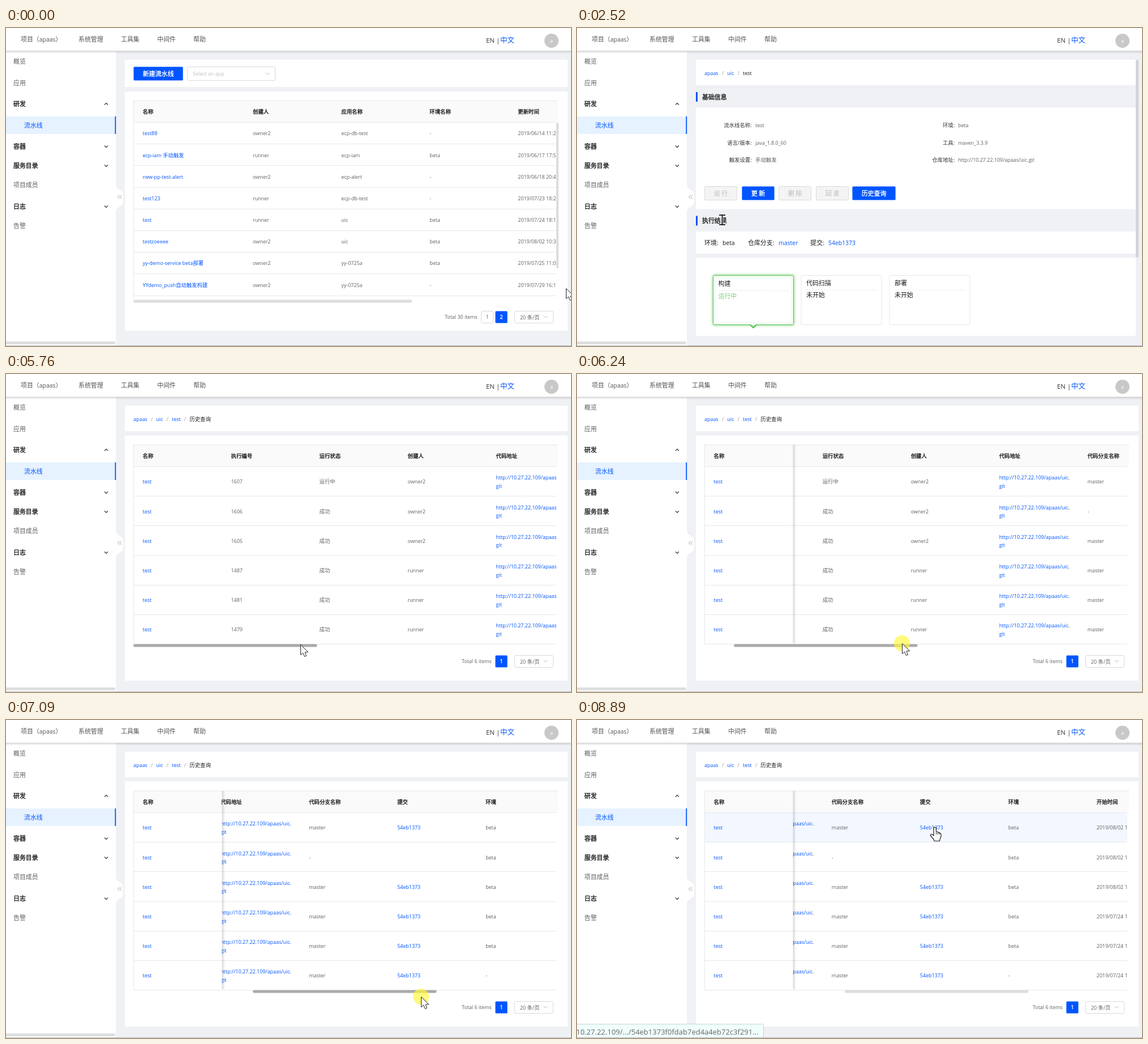
These frames come from a looping animation (998x561 px, 9.75 s). An HTML page with a canvas:

```html
<!DOCTYPE html>
<html lang="zh">
<head>
<meta charset="utf-8">
<style>
html, body { margin: 0; width: 100%; height: 100%; overflow: hidden; background: #f0f2f5; }
canvas { display: block; }
</style>
</head>
<body>
<canvas id="stage" width="998" height="561"></canvas>
<script>
const ctx = document.getElementById('stage').getContext('2d');
const LOOP = 9750;
const BLUE = '#0055ff', BG = '#eff1f5', INK = '#1c1c1c', GREY = '#606060', LINE = '#e6e8eb';
const SMALL = 9.4, BODY = 10.95;
const ROW = 52.2, ROW_TOP = 163.5;

// Text: Latin runs are set a little smaller so both scripts look equally large.
const runs = s => s.match(/[\u2e80-\uffef]+|[^\u2e80-\uffef]+/g) || [];
function setFont(run, size) {
  ctx.font = /[\u2e80-\uffef]/.test(run)
    ? `${size}px "Noto Sans CJK SC", "Noto Sans CJK", sans-serif`
    : `${size * 0.95}px "Open Sans", "Noto Sans", sans-serif`;
}
function textWidth(s, size = SMALL) {
  return runs(s).reduce((sum, run) => {
    setFont(run, size);
    return sum + ctx.measureText(run).width;
  }, 0);
}
// Weight 500 is a regular face with a hairline outline.
function text(s, x, y, color = GREY, size = SMALL, weight = 400, align = 0) {
  x -= align * textWidth(s, size);
  ctx.fillStyle = ctx.strokeStyle = color;
  ctx.lineWidth = 0.35;
  for (const run of runs(s)) {
    setFont(run, size);
    const baseline = Math.round(y + size * 0.37);
    ctx.fillText(run, x, baseline);
    if (weight === 500) ctx.strokeText(run, x, baseline);
    x += ctx.measureText(run).width;
  }
}

// Shapes
function rect(x, y, w, h, color) {
  ctx.fillStyle = color;
  ctx.fillRect(x, y, w, h);
}
function pill(x, y, w, h, color, r = h / 2) {
  ctx.fillStyle = color;
  ctx.beginPath();
  ctx.roundRect(x, y, w, h, r);
  ctx.fill();
}
function frame(x, y, w, h, fill, stroke) {
  ctx.beginPath();
  ctx.roundRect(x + 0.5, y + 0.5, w - 1, h - 1, 2);
  ctx.fillStyle = fill;
  ctx.fill();
  ctx.strokeStyle = stroke;
  ctx.lineWidth = 1;
  ctx.stroke();
}
const solid = (x, y, w, h, color) => pill(x + 0.4, y + 0.4, w - 0.8, h - 0.8, color, 1.5);
function polyline(points, stroke, width = 1, fill) {
  ctx.beginPath();
  points.forEach(([x, y]) => ctx.lineTo(x, y));
  if (fill) {
    ctx.closePath();
    ctx.fillStyle = fill;
    ctx.fill();
  }
  ctx.strokeStyle = stroke;
  ctx.lineWidth = width;
  ctx.stroke();
}
function chevron(x, y, color, dir = 1, half = 3, width = 1) {
  polyline([[x - half, y - dir * half / 2], [x, y + dir * half / 2], [x + half, y - dir * half / 2]], color, width);
}
function clipped(x, y, w, h, draw) {
  ctx.save();
  ctx.beginPath();
  ctx.rect(x, y, w, h);
  ctx.clip();
  draw();
  ctx.restore();
}
const card = (y, bottom, right = 992) => rect(210, y, right - 210, bottom - y, '#fff');

function button(label, x, w, y, state = 'primary') {
  const off = state === 'disabled';
  if (off) frame(x, y, w, 25, '#f4f4f4', '#d9d9d9');
  else solid(x, y, w, 25, state === 'hover' ? '#2b78ff' : BLUE);
  text(label, x + w / 2, y + 13, off ? '#b9b9b9' : '#fff', BODY, off ? 400 : 500, 0.5);
}

// Page frame
function shell() {
  rect(0, 0, 998, 561, BG);
  rect(0, 41, 194, 520, '#fff');
  polyline([[194, 279], [196, 283], [205, 289], [206.5, 292], [206.5, 308], [205, 312], [196, 318], [194, 322]], '#fff', 1, '#fff');
  for (const x of [197.5, 201])
    polyline([[x + 3, 294.5], [x, 298], [x + 3, 301.5]], '#aaa');

  rect(0, 0, 998, 41, '#fff');
  const shade = ctx.createLinearGradient(0, 40, 0, 45);
  shade.addColorStop(0, 'rgba(0,0,0,.17)');
  shade.addColorStop(1, 'rgba(0,0,0,0)');
  rect(0, 40, 998, 5, shade);
  [['项目（apaas）', 26], ['系统管理', 128], ['工具集', 203], ['中间件', 267], ['帮助', 331]]
    .forEach(([label, x]) => text(label, x, 20, '#555', BODY));
  text('EN |', 848, 21.5, '#333', 12);
  text('中文', 873, 21.5, BLUE, 12.5);
  pill(951, 10, 25, 25, '#c8c8c8');
  text('a', 963.5, 23, '#fff', 9.4, 400, 0.5);

  rect(0, 156, 194, 31, '#e6f2ff');
  rect(192.4, 156, 1.8, 31, BLUE);
  text('流水线', 32, 171.5, BLUE, BODY);
  [['概览', 59], ['应用', 97], ['研发', 134, -1], ['容器', 209, 1], ['服务目录', 243, 1],
    ['项目成员', 277], ['日志', 315, 1], ['告警', 349]].forEach(([label, y, dir]) => {
    text(label, 13, y, dir ? INK : GREY, BODY, dir ? 500 : 400);
    if (dir) chevron(177, y, '#444', dir, 3, 1.3);
  });
  pill(-3, 553, 196, 5, '#dedede');
}

function crumbs(...names) {
  let x = 225;
  names.forEach((name, i) => {
    const last = i === names.length - 1;
    text(name, x, 79.5, last ? INK : BLUE);
    x += textWidth(name);
    if (!last) text('/', x + 6.3, 79.5, '#999');
    x += 15.7;
  });
}

function pager(total, pages, y) {
  text(`Total ${total} items`, pages > 1 ? 775 : 805, y + 11);
  if (pages > 1) {
    frame(839, y, 22, 22, '#fff', '#d9d9d9');
    text('1', 850, y + 11, GREY, SMALL, 400, 0.5);
  }
  solid(864, y, 22, 22, BLUE);
  text(String(pages), 875, y + 11, '#fff', SMALL, 500, 0.5);
  frame(898, y, 69, 22, '#fff', '#d9d9d9');
  text('20 条/页', 908, y + 11.5);
  chevron(953, y + 10.5, '#bbb', 1, 3.5);
}

// Pages
const PIPELINES = [
  ['test88', 'owner2', 'ecp-db-test', '-', '2019/06/14 11:23'],
  ['ecp-iam 手动触发', 'runner', 'ecp-iam', 'beta', '2019/06/17 17:55'],
  ['new-pp-test-alert', 'owner2', 'ecp-alert', '-', '2019/06/18 20:42'],
  ['test123', 'runner', 'ecp-db-test', '-', '2019/07/23 18:20'],
  ['test', 'runner', 'uic', 'beta', '2019/07/24 18:15'],
  ['testzoeeee', 'owner2', 'uic', 'beta', '2019/08/02 10:35'],
  ['yy-demo-service beta部署', 'owner2', 'yy-0725a', 'beta', '2019/07/25 11:02'],
  ['YYdemo_push自动触发构建', 'owner2', 'yy-0725a', '-', '2019/07/29 16:15']
];

function listPage() {
  card(56, 104);
  button('新建流水线', 225, 88, 68);
  frame(320, 68, 156, 25, '#fff', '#d9d9d9');
  text('Select an app', 330, 81, '#bfbfbf');
  chevron(462, 80.5, '#bbb', 1, 3.5);

  card(112, 534);
  rect(225, 128, 750, 38, '#fafafa');
  rect(225, 127.5, 750, 1, LINE);
  rect(225, 128, 1, 351, LINE);
  const xs = [241.5, 436, 592.3, 748.3, 904.3];
  ['名称', '创建人', '应用名称', '环境名称', '更新时间']
    .forEach((label, i) => text(label, xs[i], 147.5, INK, SMALL, 500));
  for (let i = 0; i < 9; i++) rect(225, Math.round(166 + i * 38.2), 747, 1, LINE);
  clipped(226, 166, 746, 313, () => PIPELINES.forEach((row, r) =>
    row.forEach((cell, c) => text(cell, xs[c], 186 + r * 38.15, c ? GREY : BLUE))));
  pill(972, 167, 4, 257, '#dcdcdc');
  pill(225, 479.6, 492, 5, '#dcdcdc');
  pager(30, 2, 499);
}

function section(label, y) {
  rect(210, y - 8.5, 3, 17, BLUE);
  text(label, 221, y, INK, BODY, 500);
}

function stageCard(x, label, status, active) {
  const dy = active ? 1.5 : 0;
  ctx.save();
  if (active) {
    ctx.shadowColor = 'rgba(70,190,70,.7)';
    ctx.shadowBlur = 5;
  }
  frame(x, 436, 143, 88, '#fff', active ? '#5cc95c' : '#e6e6e6');
  ctx.restore();
  text(label, x + 9.5, 449.5 + dy, INK, BODY);
  ctx.setLineDash([3, 2]);
  polyline([[x + 10, 462 + dy], [x + 133, 462 + dy]], '#e8e8e8');
  ctx.setLineDash([]);
  ctx.globalAlpha = active ? 0.75 : 1;
  text(status, x + 9.5, 471 + dy, active ? '#4cc04c' : INK, BODY);
  ctx.globalAlpha = 1;
  if (active) {
    rect(306, 522, 11, 2, '#fff');
    chevron(311.5, 526, '#4cc04c', 1, 5.5, 2);
  }
}

function detailPage(hot) {
  card(56, 101, 987);
  crumbs('apaas', 'uic', 'test');
  section('基础信息', 121.5);
  card(140.5, 319.5, 987);
  [['流水线名称', 'test', '环境', 'beta'],
    ['语言/版本', 'java_1.8.0_60', '工具', 'maven_3.3.9'],
    ['触发设置', '手动触发', '仓库地址', 'http://10.27.22.109/apaas/uic.git']].forEach((row, i) => {
    const y = 172 + i * 30.4;
    [[308.5, 315], [667, 673]].forEach(([labelX, valueX], c) => {
      text(row[c * 2] + ':', labelX, y, '#333', SMALL, 400, 1);
      text(row[c * 2 + 1], valueX, y);
    });
  });
  button('运 行', 225, 58, 279, 'disabled');
  button('更 新', 291, 58, 279);
  button('删 除', 356, 58, 279, 'disabled');
  button('回 滚', 422, 58, 279, 'disabled');
  button('历史查询', 486, 77, 279, hot ? 'hover' : 'primary');
  section('执行结果', 340);
  card(359, 398, 987);
  [['环境:', 225], ['beta', 257], ['仓库分支:', 302], ['master', 356, BLUE], ['提交:', 412], ['54eb1373', 444, BLUE]]
    .forEach(([s, x, color]) => text(s, x, 379, color || INK, BODY));
  card(405.5, 543, 987);
  stageCard(240, '构建', '运行中', true);
  stageCard(395.5, '代码扫描', '未开始');
  stageCard(551.5, '部署', '未开始');
  pill(987, 56, 5, 349, '#d2d4d8');
}

function loadingPage(t, names) {
  card(56, 101, 987);
  crumbs(...names);
  card(108.5, 537, 987);
  const turn = (t - 4140) / 1200 * Math.PI * 2 - 1.48;
  for (let i = 0; i < 4; i++) {
    const a = turn + i * Math.PI / 2;
    pill(614.3 + 6.4 * Math.cos(a) - 2.9, 338.3 + 6.4 * Math.sin(a) - 2.9, 5.8, 5.8, i % 2 ? '#a5c5ff' : '#b3ceff');
  }
  pill(987, 56, 5, 469, '#d2d4d8');
  pill(210, 537.5, 762, 5, '#d2d4d8');
  rect(987, 538, 5, 5, '#fff');
}

const HEADS = ['名称', '执行编号', '运行状态', '创建人', '代码地址', '代码分支名称', '提交', '环境', '开始时间'];
const HISTORY = [1607, 1606, 1605, 1487, 1481, 1479].map((id, i) => [
  'test', String(id), i ? '成功' : '运行中', i < 3 ? 'owner2' : 'runner', 'http://10.27.22.109/apaas/uic.',
  i === 1 ? '-' : 'master', i === 1 ? '' : '54eb1373', i === 5 ? '-' : 'beta',
  (i < 3 ? '2019/08/02' : '2019/07/24') + ' 16:20'
]);

function historyPage(shift, hoverRow, barHot) {
  const scroll = shift * 2.305;
  const colX = c => c ? 241.5 + c * 156 - scroll : 241.5;
  const rowY = r => ROW_TOP + r * ROW;
  card(56, 101);
  crumbs('apaas', 'uic', 'test', '历史查询');
  card(108.5, 541);
  rect(225, 125, 750, 38, '#fafafa');
  rect(225, 124.5, 750, 1, LINE);
  if (hoverRow >= 0) rect(225, rowY(hoverRow), 747, ROW, '#f3f7ff');
  for (let r = 0; r < 7; r++) rect(225, Math.round(rowY(r) - 0.5), 747, 1, LINE);
  rect(225, 125, 1, 352, LINE);

  const cells = c => {
    text(HEADS[c], colX(c), 145, INK, SMALL, 500);
    HISTORY.forEach((row, r) => {
      const y = 190 + r * ROW;
      const link = c === 0 || c === 4 || c === 6;
      text(row[c], colX(c), c === 4 ? y - 7 : y, link ? BLUE : GREY);
      if (c === 4) text('git', colX(c), y + 7.5, BLUE);
    });
  };
  cells(0);
  const left = shift ? 381 : 226;
  clipped(left, 125, 972 - left, 351, () => { for (let c = 1; c < 9; c++) cells(c); });
  if (shift) {
    const shade = ctx.createLinearGradient(381, 0, 387, 0);
    shade.addColorStop(0, 'rgba(0,0,0,.17)');
    shade.addColorStop(1, 'rgba(0,0,0,0)');
    rect(381.5, 125, 6, 350, shade);
  }
  pill(225 + shift, 476.5, 324.5, 5, barHot ? '#aaa' : '#dcdcdc');
  pager(6, 1, 496);
}

function statusBar(label, alpha = 1) {
  ctx.globalAlpha = alpha;
  frame(-3, 536, 333, 28, '#f0fffd', '#c9d3d2');
  text(label, -1.5, 550, '#666', 13.7);
  ctx.globalAlpha = 1;
}

// Pointer: each move runs from the previous place in n held steps.
const MOVES = [
  [380, 1350, 14, 274, 346, 38],
  [1470, 1740, 5, 254, 338],
  [2350, 2350, 1, 256, 338],
  [2760, 3670, 13, 532, 291],
  [3750, 3750, 1, 532, 290],
  [5080, 5370, 5, 520, 479],
  [5760, 5760, 1, 520, 477],
  [6000, 6620, 9, 642, 473],
  [6700, 6940, 4, 716, 482],
  [7030, 7090, 2, 733, 488],
  [7170, 7410, 4, 770, 490],
  [7810, 8740, 13, 632, 189]
];
function pointerAt(t) {
  let x = 989, y = 459;
  for (const [start, end, n, toX, toY, bow = 0] of MOVES) {
    if (t < start) break;
    const step = n > 1 ? (end - start) / (n - 1) : 1;
    let p = Math.min(n, Math.floor((t - start) / step + 1e-6) + 1) / n;
    if (n > 9) p = p * p * (3 - 2 * p);
    x += (toX - x) * p;
    y += (toY - y) * p + bow * Math.sin(2 * Math.PI * p);
  }
  return [Math.round(x), Math.round(y)];
}

const ARROW = [[0.5, 0.5], [0.5, 18.5], [4.5, 15], [7.5, 21.5], [10.5, 20.2], [8, 14], [13.5, 13.5]];
function drawPointer(kind, x, y) {
  ctx.save();
  ctx.translate(x, y);
  if (kind === 'arrow') polyline(ARROW, '#222', 1, '#fff');
  if (kind === 'beam') {
    for (const [color, w] of [['#fff', 4], ['#111', 1.8]]) {
      polyline([[0.5, -8], [0.5, 9]], color, w);
      polyline([[-5, -8], [6, -8]], color, w);
      polyline([[-5, 9], [6, 9]], color, w);
    }
  }
  if (kind === 'hand') {
    ctx.lineJoin = 'round';
    polyline([[-2, 1], [0, 0], [2, 1], [2.5, 8], [5, 8], [6, 9.5], [8.5, 9.5], [9.5, 11], [11, 12],
      [11, 17], [9, 21], [8.5, 24.5], [-1, 24.5], [-2, 21.5], [-7.5, 15], [-7.5, 13], [-5, 12.5], [-2, 15]], '#222', 1.2, '#fff');
    for (const fx of [2.5, 5.5, 8.5]) polyline([[fx, 9], [fx, 13]], '#222');
  }
  ctx.restore();
}

const between = (v, a, b) => v >= a && v < b;

function draw(t) {
  const [x, y] = pointerAt(t);
  const waiting = '正在等待 beta-portal-cn4.eniot.io 的响应...';
  let kind = 'arrow';
  shell();

  if (t < 2050) {
    listPage();
    if (t >= 1740) kind = 'hand';
  } else if (t < 2350) {
    loadingPage(t, ['apaas', 'test']);
  } else if (t < 4075) {
    const hot = between(x, 486, 563) && between(y, 279, 304);
    detailPage(hot);
    kind = hot ? 'hand' : x < 266 ? 'beam' : 'arrow';
  } else if (t < 4550) {
    loadingPage(t, ['apaas', '历史查询']);
  } else {
    const shift = t < 7810 ? Math.min(248, Math.max(0, x - 522)) : 248;
    const hovering = between(t, 5080, 5370) || t >= 7810;
    const row = Math.floor((y - ROW_TOP) / ROW);
    const onBar = between(t, 5370, 7810) || (t > 7810 && between(y, 476, 483));
    historyPage(t < 6000 ? 0 : shift, hovering && between(row, 0, 6) ? row : -1, onBar);
    if (t > 8000 && between(x, 605, 648) && between(y, 183, 197)) kind = 'hand';
  }

  if (between(t, 2050, 2480) || between(t, 4075, 4750)) statusBar(waiting);
  if (t >= 8740)
    statusBar('10.27.22.109/.../54eb1373f0fdab7ed4a4eb72c3f291...', t < 8830 ? 0.5 : t < 8890 ? 0.8 : 1);
  rect(0, 560, 998, 1, '#b4b6b9');

  const pressed = between(t, 1900, 2050) || between(t, 4010, 4075) || between(t, 5830, 7810);
  if (pressed) pill(x - 14, y - 14, 28, 28, 'rgba(255,248,60,.68)');
  drawPointer(kind, x, y);
}

const began = performance.now();
function tick() {
  draw((performance.now() - began) % LOOP);
  requestAnimationFrame(tick);
}
tick();
</script>
</body>
</html>
```
